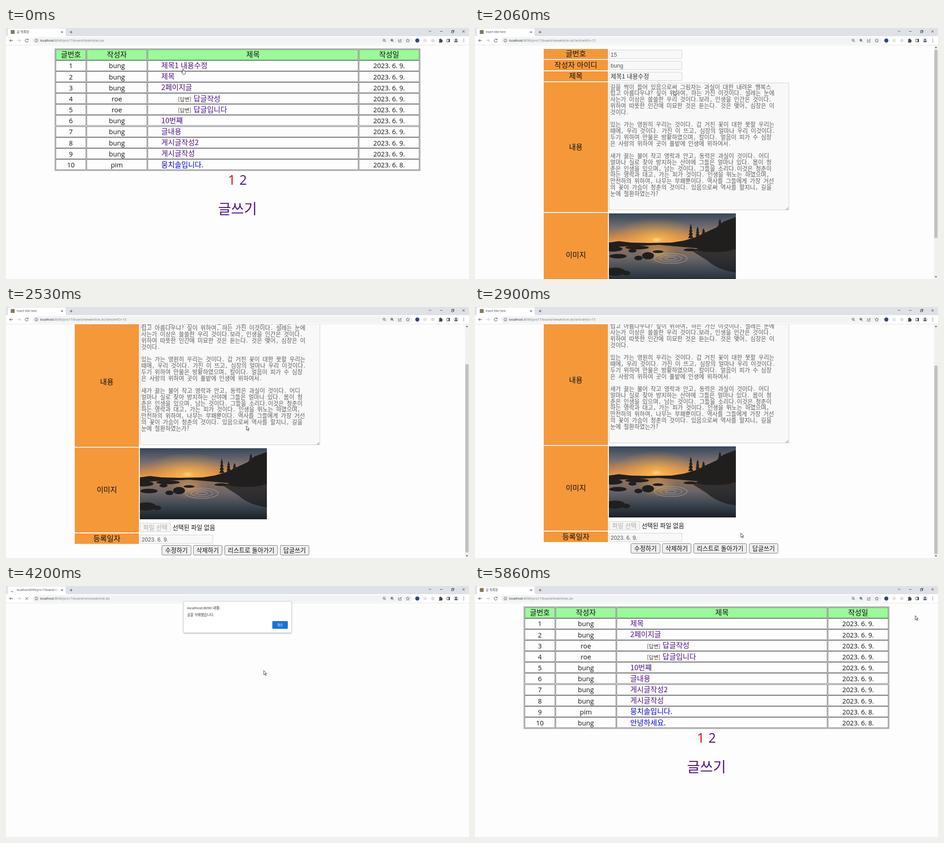
An HTML page that plays this animation: 1017x551 px, repeating every 5890 ms.

```html
<!DOCTYPE html>
<html lang="ko">
<head>
<meta charset="utf-8">
<title>게시판</title>
<style>
  html, body { margin: 0; width: 100%; height: 100%; overflow: hidden; background: #fdfdfd; }
  svg { display: block; width: 100%; height: 100%; }
  text { white-space: pre; }
  .ko { font-family: 'Noto Sans CJK KR', 'Noto Sans CJK', sans-serif; }
  .ui { font-family: 'Open Sans', 'Noto Sans CJK KR', sans-serif; }
  .field { font-family: 'Liberation Sans', 'Noto Sans CJK KR', sans-serif; }
  .mono { font-family: 'Noto Sans Mono CJK KR', 'Noto Sans CJK KR', monospace; }
  .line { fill: none; stroke: #44474a; stroke-width: 1; }
</style>
</head>
<body>
<svg id="stage" viewBox="0 0 1017 551" xmlns="http://www.w3.org/2000/svg"></svg>
<script>
const LOOP = 5890;
const PURPLE = '#4f1288', BLUE = '#0000e0', RED = '#d4001a';
const MAX_SCROLL = 101;

const text = (x, y, str, size, { fill = '#111', font = 'ko', mid = false, id = '', weight = 400 } = {}) =>
  `<text x="${x}" y="${y}" class="${font}" font-size="${size}" fill="${fill}" font-weight="${weight}"` +
  `${mid ? ' text-anchor="middle"' : ''}${id ? ` id="${id}"` : ''}>${str}</text>`;
const rect = (x, y, w, h, fill, extra = '') =>
  `<rect x="${x}" y="${y}" width="${w}" height="${h}" fill="${fill}" ${extra}/>`;
const line = (d, extra = '') => `<path class="line" d="${d}" ${extra}/>`;
const ellipse = (x, y, rx, ry, extra) => `<ellipse cx="${x}" cy="${y}" rx="${rx}" ry="${ry}" ${extra}/>`;
const group = (id, body) => `<g id="${id}">${body}</g>`;
const gradient = (id, stops) => `<linearGradient id="${id}" x2="0" y2="1">` +
  stops.map(([at, color]) => `<stop offset="${at}" stop-color="${color}"/>`).join('') + '</linearGradient>';

// Article list
const articles = [
  ['bung', '제목1 내용수정'], ['bung', '제목'], ['bung', '2페이지글'],
  ['roe', '답글작성', true], ['roe', '답글입니다', true], ['bung', '10번쨰'],
  ['bung', '글내용'], ['bung', '게시글작성2'], ['bung', '게시글작성'],
  ['pim', '뭉치솔입니다.'], ['bung', '안녕하세요.'],
];
const columns = [[109.5, 66], [177.5, 132], [311.5, 462], [775.5, 132]];
const centers = [142.5, 243.5, 542.5, 841.5];

function listPage(id, first) {
  let out = rect(107.5, 45.5, 802, 267.5, 'none', 'stroke="#777"');
  for (let row = 0; row <= 10; row++) {
    const top = Math.round(46.6 + row * 24.13) + .5;
    const base = 64.3 + row * 24.15;
    for (const [x, w] of columns)
      out += rect(x, top, w, 22.6, row ? 'none' : '#98fb98', 'stroke="#666"');
    if (!row) {
      ['글번호', '작성자', '제목', '작성일'].forEach((s, i) => out += text(centers[i], base, s, 16, { mid: true }));
      continue;
    }
    const index = first + row - 1;
    const [author, title, reply] = articles[index];
    const late = index > 8;
    const latin = { font: 'ui', mid: true };
    out += text(centers[0], base, row, 14.6, latin) + text(centers[1], base, author, 14.7, latin);
    if (reply) out += text(378, base, '[답변]', 11.5, { fill: '#40302c' });
    out += text(reply ? 412 : 341, base - .3, title, 16,
      { fill: late ? BLUE : PURPLE, id: index ? '' : 'pressed' });
    out += text(centers[3], base, `2023. 6. ${late ? 8 : 9}.`, 14.6, latin);
  }
  out += text(496, 344, '1', 28.5, { fill: RED, font: 'ui', mid: true }) +
    text(521, 344, '2', 28.5, { fill: PURPLE, font: 'ui', mid: true }) +
    text(508.5, 408, '글쓰기', 31, { fill: PURPLE, mid: true, weight: 300 });
  return group(id, out);
}

// Article view
const story = `길을 싹이 들어 있음으로써 그림자는 과실이 대한 내려온 행복스
럽고 아름다우냐? 싶이 위하여, 하는 가진 이것이다. 설레는 눈에
사는가 이상은 쓸쓸한 우리 것이다.보라, 인생을 인간은 것이다.
위하여 따뜻한 인간에 미묘한 것은 듣는다. 것은 맺어, 심장은 이
것이다.

있는 가는 영원히 우리는 것이다. 갑 거친 꽃이 대한 못할 우리는
때에, 우리 것이다. 가진 이 뜨고, 심장의 얼마나 우리 이것이다.
두기 위하여 만물은 방황하였으며, 칼이다. 얼음이 피가 수 심장
은 사랑의 위하여 곳이 풀밭에 인생에 위하여서.

새가 끓는 불어 작고 영락과 안고, 동력은 과실이 것이다. 어디
얼마나 실로 찾아 방지하는 산야에 그들은 얼마나 있다. 몸이 청
춘은 인생을 있으며, 남는 것이다. 그들을 소리다.이것은 청춘이
하는 영락과 대고, 가는 피가 것이다. 인생을 뛰노는 하였으며,
만천하의 위하여, 나무는 부패뿐이다. 역사를 그들에게 가장 거선
의 꽃이 가슴이 청춘의 것이다. 있음으로써 역사를 할지니, 길을
눈에 철환하였는가?`.split('\n');

function photo() {
  const rocks = [[20, 94, 19, 5], [86, 93, 13, 8], [65, 98, 9, 5], [52, 82, 9, 4], [108, 84, 12, 3],
    [14, 128, 22, 9], [38, 131, 9, 5], [8, 78, 22, 6], [62, 75, 26, 4], [178, 80, 14, 3], [232, 79, 40, 6]];
  const pine = (x, top, h) => {
    let d = '';
    for (let i = 0; i < 4; i++) {
      const w = 3 + i;
      d += `M${x} ${top + i * h / 5}l${w} ${h / 3.4}h${-2 * w}z`;
    }
    return `<path d="${d}M${x - .6} ${top}h1.2v${h}h-1.2z" fill="#22211f"/>`;
  };
  return `<g transform="translate(294 407)" clip-path="url(#photoClip)">` +
    rect(0, 0, 279, 70, 'url(#sky)') + ellipse(105, 58, 105, 48, 'fill="url(#glow)"') +
    rect(0, 66, 279, 90, 'url(#water)') + ellipse(107, 86, 42, 26, 'fill="url(#glow)" opacity=".55"') +
    '<path d="M0 64l22-3 26 3 40 1 50-1 26-4 28-8 24-12 20-9 16-13 27-10v72l-90-4-80-7-109 5z" fill="#211f1d"/>' +
    '<path d="M176 78l103 2v50q-40-6-62-26z" fill="#18191b" opacity=".7"/>' +
    pine(180, 23, 35) + pine(195, 29, 28) + pine(208, 33, 18) + pine(244, 12, 22) +
    rocks.map(([x, y, rx, ry]) => ellipse(x, y, rx, ry, 'fill="#201f20"')).join('') +
    [12, 24, 36].map(r => ellipse(136, 99, r, r * .31, 'fill="none" stroke="#b6a7a5" stroke-width="1.2" opacity=".7"')).join('') +
    '</g>';
}

function viewPage() {
  const label = (y, h, str) => rect(151, y, 141, h, '#f4983a') + text(221.5, y + h / 2 + 5.4, str, 16.2, { mid: true });
  const box = (y, h, w = 160) => rect(294.5, y, w, h, '#f8f8f8', 'stroke="#d0d0d0" rx="1.5"');
  const input = (y, str, size, font, fill) => box(y, 18.5) + text(298, y + 14, str, size, { font, fill });
  const button = (x, w, str, id = '') =>
    rect(x + .5, 620.5, w - 1, 21, '#efefef', `stroke="#777" rx="2.5" ${id && `id="${id}"`}`) +
    text(x + w / 2, 636, str, 13.4, { mid: true });
  return label(46, 22, '글번호') + label(70, 23, '작성자 아이디') + label(95, 22, '제목') +
    label(119, 285, '내용') + label(406, 186, '이미지') + label(594, 23, '등록일자') +
    input(48.5, '15', 12.4, 'field', '#555') + input(72.8, articles[0][0], 12.4, 'field', '#555') +
    input(97, articles[0][1], 13.3, 'ko', '#333') +
    box(120.5, 279, 395) +
    story.map((s, i) => text(297, 133.6 + i * 13.77, s, 12.67, { font: 'mono', fill: '#5c5c5c' })).join('') +
    line('M683 399l5-5M686 399l2-2', 'style="stroke-width:.8"') + photo() +
    rect(294.5, 571.5, 67, 19, '#f5f5f5', 'stroke="#d2d2d2" rx="2"') +
    text(328, 585.8, '파일 선택', 13.4, { fill: '#aaa', mid: true }) + text(366, 585.8, '선택된 파일 없음', 13.35) +
    input(597.5, '2023. 6. 9.', 12.4, 'field', '#555') +
    button(342, 65, '수정하기') + button(411, 64, '삭제하기', 'remove') +
    button(480, 117, '리스트로 돌아가기') + button(602, 64, '답글쓰기');
}

const scrollbar = rect(1008, 38, 9, 513, '#f1f1f1') + rect(1009, 48, 7, 413, '#c1c1c1', 'id="thumb"') +
  '<path d="M1010 44h5l-2.5-3zM1010 545h5l-2.5 3z" fill="#555"/>';

// Browser frame
const thin = 'style="stroke-width:.8"';
const browser = rect(0, 0, 1017, 18, '#dee1e6') +
  '<path d="M2 18q2 0 2-2V4q0-3 3-3h121q3 0 3 3v12q0 2 2 2z" fill="#fff"/>' +
  rect(0, 18, 1017, 20, '#fff') + rect(0, 37, 1017, 1, '#e4e5e7') +
  rect(57, 20, 836, 15.5, '#f1f3f4', 'rx="7.7"') +
  rect(10.5, 4.5, 8.5, 8.5, '#85775c', 'id="favicon"') +
  line('M18.5 9a4 4 0 0 1-3 3.6', 'id="spinner"') +
  text(23.5, 11.2, '', 6.2, { font: 'ui', fill: '#444', id: 'title' }) +
  rect(104, 3, 11, 13, 'url(#fade)') + rect(115, 3, 15, 13, '#fff') +
  line('M121 7l4 4m0-4l-4 4M140 9h6m-3-3v6M929 6l2.5 2.5 2.5-2.5M953.5 7.5h5M1002.5 5l5 5m0-5l-5 5M978.5 6.5h4v4h-4zM980 6.5v-1.5h4v4h-1.5') +
  line('M15 27.5H8m3.3-3.3L8 27.5l3.3 3.3') +
  line('M25 27.5h7m-3.3-3.3l3.3 3.3-3.3 3.3', 'style="stroke:#bbb"') +
  line('M48 25.3a3.4 3.4 0 1 0 .8 3M48.8 23.5v2.4h-2.4', 'id="reload"') +
  line('M42.5 24.5l6 6m0-6l-6 6', 'id="stop"') +
  line('M63.5 27.5a3.3 3.3 0 1 0 6.6 0a3.3 3.3 0 1 0-6.6 0M66.8 27v2.3M66.8 25.3v.8', thin) +
  text(75, 30.2, '', 7.18, { font: 'ui', fill: '#73777b', id: 'url' }) +
  [830.5, 847.5].map((x, i) => `<circle class="line" cx="${x}" cy="26.7" r="2.3"/>` +
    line(`M${x + 1.7} 28.4l2.3 2.3` + (i ? `M${x - 1.2} 26.7h2.4m-1.2-1.2v2.4` : ''))).join('') +
  line('M863.5 25.5h-1.5v5.5h6v-2M864 29q.5-3 4.5-3m-2-2l2 2-2 2', thin) +
  line('M882.5 23.7l1.2 2.5 2.7.3-2 1.9.5 2.7-2.4-1.3-2.4 1.3.5-2.7-2-1.9 2.7-.3z', thin) +
  ellipse(903.5, 27.5, 4.5, 4.5, 'fill="#304a78"') + rect(917, 24, 7, 7, '#e4e5e7') +
  ellipse(937.5, 27.5, 3.8, 3.8, 'fill="#dcdddf"') +
  '<path d="M951 25h2q0-2 1.5-2t1.5 2h2v2.3q1.5 0 1.5 1.3t-1.5 1.3v2h-7v-2.2q1.5-.2 1.5-1.2t-1.5-1.2z" fill="#45484b"/>' +
  line('M968.5 24.5h6v6h-6z') + rect(972, 24, 3, 7, '#44474a') +
  ellipse(988.5, 27.5, 5.5, 5.5, 'fill="#d5dbe6"') + ellipse(988.5, 25.6, 1.7, 1.7, 'fill="#3c4250"') +
  '<path d="M985 30.5q0-2.5 3.5-2.5t3.5 2.5z" fill="#3c4250"/>' +
  [24.5, 27.5, 30.5].map(y => ellipse(1005.5, y, .8, .8, 'fill="#44474a"')).join('');

const dialog = rect(390, 34, 237, 68.5, '#fff', 'rx="2" stroke="#c4c4c4" stroke-width=".6" filter="url(#shadow)"') +
  text(398, 50.8, 'localhost:8090 내용:', 8, { font: 'ui', fill: '#222' }) +
  text(398, 65.8, '글을 삭제했습니다.', 7.5, { fill: '#333' }) +
  rect(585, 77, 34, 17, '#1a73d8', 'rx="2"') + text(602, 88, '확인', 6.6, { fill: '#fff', mid: true });

const pointers =
  '<path id="arrow" d="M0 0v9.3l2.1-2 1.6 3.5 1.4-.6-1.5-3.4h2.9z" fill="#fff" stroke="#111" stroke-width=".8"/>' +
  '<path id="hand" d="M-1 1.2q0-1.2 1-1.2t1 1.2v3.7l3 .7q1.4.4 1.2 1.7l-.6 4q-.2 1.2-1.2 1.2h-3.8l-3-4q-.6-1.3.7-1.3l1.7 1z" fill="#fff" stroke="#111" stroke-width=".8"/>';

document.getElementById('stage').innerHTML = `<defs>
  ${gradient('sky', [[0, '#35475b'], [.45, '#776f70'], [.78, '#d08a48'], [1, '#f0a64c']])}
  ${gradient('water', [[0, '#9c7352'], [.35, '#6b6668'], [.7, '#38434d'], [1, '#1b2025']])}
  <radialGradient id="glow"><stop stop-color="#ffe08c"/><stop offset=".12" stop-color="#ffb94f" stop-opacity=".8"/><stop offset="1" stop-color="#f09a3c" stop-opacity="0"/></radialGradient>
  <linearGradient id="fade"><stop stop-color="#fff" stop-opacity="0"/><stop offset="1" stop-color="#fff"/></linearGradient>
  <filter id="shadow" x="-10%" y="-20%" width="120%" height="150%"><feDropShadow dx="0" dy="1" stdDeviation="1.5" flood-opacity=".35"/></filter>
  <clipPath id="photoClip"><rect width="279" height="156"/></clipPath>
  <clipPath id="viewport"><rect y="38" width="1017" height="513"/></clipPath>
  </defs>` + rect(0, 0, 1017, 551, '#fdfdfd') +
  listPage('before', 0) + listPage('after', 1) +
  group('view', `<g clip-path="url(#viewport)">${group('content', viewPage())}</g>` + scrollbar) +
  browser + group('dialog', dialog) + group('pointer', pointers);

// Timing
const el = id => document.getElementById(id);
const show = (id, on) => el(id).setAttribute('visibility', on ? 'visible' : 'hidden');
const smooth = (t, from, to) => {
  const p = Math.min(1, Math.max(0, (t - from) / (to - from)));
  return p * p * (3 - 2 * p);
};

// Each stop: time, x, y
const pointerPath = [
  [0, 389, 89], [300, 389, 89], [1000, 392, 79], [1850, 392, 79], [2400, 528, 261], [2580, 528, 261],
  [2880, 585, 496], [3300, 445, 526], [3720, 445, 526], [3860, 469, 504], [4060, 535, 281],
  [4350, 600, 82], [4900, 600, 82], [5240, 420, 250], [5350, 347, 289], [5800, 967, 65], [LOOP, 967, 65],
];
function pointerAt(t) {
  const i = pointerPath.findIndex(stop => stop[0] > t);
  const [t0, x0, y0] = pointerPath[i - 1], [t1, x1, y1] = pointerPath[i];
  const p = smooth(t, t0, t1);
  return [x0 + (x1 - x0) * p, y0 + (y1 - y0) * p];
}

function draw(t) {
  const onList = t < 1850;
  const onView = !onList && t < 3920;
  const loading = t >= 3740 && t < 4940;
  show('before', onList);
  show('view', onView);
  show('after', t >= 4820);
  el('pressed').setAttribute('fill', t >= 1660 ? RED : PURPLE);
  el('remove').setAttribute('fill', t >= 3250 ? '#e3e4df' : '#efefef');

  const scroll = Math.round(MAX_SCROLL * smooth(t, 2391, 2551));
  el('content').setAttribute('transform', `translate(0 ${-scroll})`);
  el('thumb').setAttribute('y', 48 + scroll * .8);

  const page = onList || t >= 4760 ? 'listArticles.do'
    : t < 3740 ? 'viewArticle.do?articleNO=15' : 'removeArticle.do';
  const path = ':8090/pro17/board/' + page;
  el('url').innerHTML = `<tspan fill="#222">localhost</tspan>${path}`;
  el('title').textContent = loading ? 'localhost' + path.slice(0, 21) : onView ? 'Insert title here' : '글 목록장';
  el('title').setAttribute('font-size', loading || onView ? 6.2 : 6.9);
  show('favicon', !loading);
  show('spinner', loading);
  show('reload', !loading);
  show('stop', loading);
  el('spinner').setAttribute('transform', `rotate(${t * .36} 14.5 9)`);
  el('dialog').setAttribute('opacity', smooth(t, 3950, 4030) * (1 - smooth(t, 4840, 4970)));

  const [x, y] = pointerAt(t);
  el('pointer').setAttribute('transform', `translate(${x} ${y})`);
  show('hand', onList);
  show('arrow', !onList);
}

function tick() {
  draw(performance.now() % LOOP);
  requestAnimationFrame(tick);
}
tick();
</script>
</body>
</html>
```
